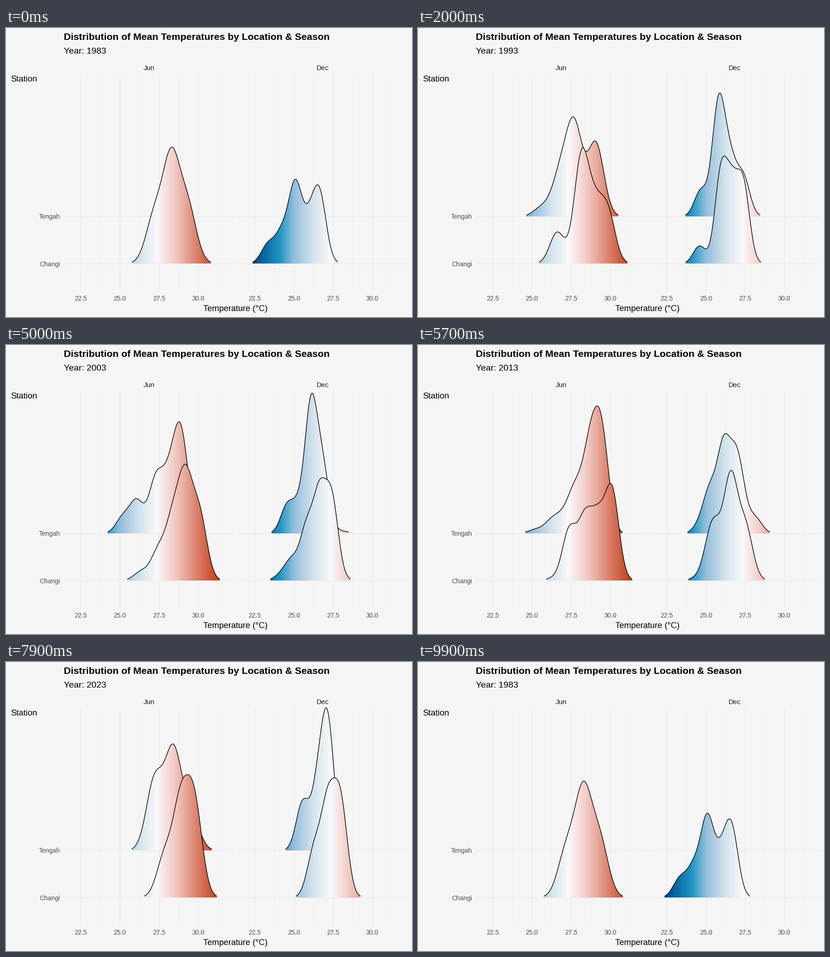
Recreate the animation shown at these times as a matplotlib script. Size 885 px wide and 632 px high, loop 10 s.

```python
import numpy as np
import matplotlib.pyplot as plt
from matplotlib.animation import FuncAnimation
from matplotlib.colors import LinearSegmentedColormap
from matplotlib.path import Path

W, H, DPI = 885, 632, 64
PX = 72 / DPI                  # points per pixel
CUT = 3                        # ridges are trimmed below this height
TOP, BOTTOM, DEG = 101, 576, 34.2
PANELS = {"Jun": (126, 497, 162.5), "Dec": (505, 876, 542)}  # left, right, x of 22.5 degrees
BASES = {"Tengah": 412, "Changi": 515}
STARTS = [11, 31, 50, 70, 90]  # first moving frame of each transition
X = np.arange(126, 876, 0.5)


def density(width, *modes):
    """Sum of equal-width bells, each given as (x, height)."""
    return sum(h * np.exp(-((X - x) / width) ** 2 / 2) for x, h in modes)


STATES = {
    1983: {
        "Jun Changi": density(18.5, (323, 100), (360, 223), (396, 118)),
        "Dec Changi": density(14.5, (570, 40), (600, 62), (630, 168), (660, 75), (683, 145)),
    },
    1993: {
        "Jun Tengah": density(17.5, (270, 20), (309, 86), (340, 194), (387, 159)),
        "Jun Changi": density(16, (303, 68), (356, 231), (386, 106), (413.5, 106)),
        "Dec Tengah": density(14, (616, 56), (655, 247), (681, 107), (709, 82)),
        "Dec Changi": density(13.5, (613, 38), (660, 192), (684, 146), (709, 164)),
    },
    2003: {
        "Jun Tengah": density(15, (254, 38), (284, 75), (326, 123), (355, 108), (380, 210)),
        "Jun Changi": density(16, (294.5, 21), (332, 55), (363, 121), (391, 221), (422, 125)),
        "Dec Tengah": density(13.5, (611, 62), (636, 49), (664.5, 288), (689.5, 132)),
        "Dec Changi": density(14, (599, 13), (621, 42), (655, 112), (683, 172), (709.5, 180)),
    },
    2013: {
        "Jun Tengah": density(15.5, (303, 34), (342, 87), (374, 165), (400, 255)),
        "Jun Changi": density(15, (329, 122), (363, 127), (392, 98), (422.5, 209)),
        "Dec Tengah": density(15, (635, 100), (667, 157), (697, 172), (734, 42)),
        "Dec Changi": density(15.5, (641, 137), (681, 235), (716, 98)),
    },
    2023: {
        "Jun Tengah": density(18, (323.5, 152), (364, 212), (402, 79)),
        "Jun Changi": density(17, (345, 87), (380, 195), (410, 200)),
        "Dec Tengah": density(14, (646, 103), (679, 124), (701, 268)),
        "Dec Changi": density(15, (671, 99), (701, 193), (728.5, 203)),
    },
}
YEARS = list(STATES)

STOPS = [(22.3, "#013f6e"), (22.9, "#03609f"), (24.1, "#2095c4"),
         (25.0, "#93bedc"), (26.2, "#d2e2ec"), (27.35, "#f9f9fa"),
         (28.4, "#f3cfc9"), (29.0, "#ebb2a7"), (30.0, "#db7c65"), (31.5, "#ba3810")]
COLD, HOT = STOPS[0][0], STOPS[-1][0]
CMAP = LinearSegmentedColormap.from_list(
    "temp", [((t - COLD) / (HOT - COLD), c) for t, c in STOPS])

fig = plt.figure(figsize=(W / DPI, H / DPI), dpi=DPI, facecolor="#f5f5f5")
ax = fig.add_axes([0, 0, 1, 1])
ax.axis("off")


def label(x, y, text, size, color="black", ha="left", weight="normal"):
    return ax.text(x, y, text, fontsize=size * PX, color=color, ha=ha,
                   va="baseline", weight=weight, family="Liberation Sans")


def rule(xs, ys, width):
    ax.plot(xs, ys, color="#ebebeb", lw=width * PX, solid_capstyle="butt", zorder=1)


class Ridge:
    def __init__(self, month, station, z):
        self.key = f"{month} {station}"
        self.base = BASES[station]
        left, right, origin = PANELS[month]
        temp = 22.5 + (np.arange(left, right) + 0.5 - origin) / DEG
        colors = CMAP((temp - COLD) / (HOT - COLD))[None, :, :3]
        self.fill = ax.imshow(colors, extent=(left, right, self.base, 80),
                              aspect="auto", interpolation="nearest", zorder=z)
        self.line, = ax.plot([], [], color="black", lw=1.4 * PX, zorder=z + 0.5,
                             solid_capstyle="butt", solid_joinstyle="round")

    def update(self, old, new, f):
        a, b = old.get(self.key), new.get(self.key)
        if f in (0, 1):
            h = b if f else a
        else:  # a ridge missing at either end is not tweened
            h = None if a is None or b is None else (1 - f) * a + f * b
        self.fill.set_visible(h is not None)
        self.line.set_visible(h is not None)
        if h is None:
            return
        keep = h >= CUT
        x, y = X[keep] + 0.5, self.base - h[keep]
        self.line.set_data(x, y)
        outline = np.column_stack([np.r_[x[0], x, x[-1]],
                                   np.r_[self.base, y, self.base]])
        self.fill.set_clip_path(Path(outline), ax.transData)


label(126, 26.5, "Distribution of Mean Temperatures by Location & Season", 21.24,
      weight="bold")
year_text = label(126, 56, "", 19.2)
label(10.5, 117, "Station", 18.6)
label(500.5, 619, "Temperature (°C)", 18.2, ha="center")
for name, base in BASES.items():
    label(118.5, base + 5.5, name, 14, "#4d4d4d", "right")

for month, (left, right, origin) in PANELS.items():
    label((left + right) / 2, 92, month, 15, "#1a1a1a", "center")
    for k in range(8):
        x = origin + 1.25 * k * DEG
        rule([x, x], [TOP, BOTTOM], 0.7 if k % 2 else 1.4)
        if k % 2 == 0:
            label(x, 596, f"{22.5 + 1.25 * k:.1f}", 14, "#4d4d4d", "center")
    for base in BASES.values():
        rule([left, right], [base - 0.5] * 2, 1.4)

ridges = [Ridge(month, station, z) for month in PANELS
          for z, station in enumerate(BASES, 2)]
ax.set(xlim=(0, W), ylim=(H, 0))


def update(n):
    i, k = 0, 0
    for j, start in enumerate(STARTS):
        if n >= start:
            i, k = j, min(n - start + 1, 10)
    old, new = YEARS[i], YEARS[(i + 1) % len(YEARS)]
    year_text.set_text(f"Year: {new if k > 5 else old}")
    for ridge in ridges:
        ridge.update(STATES[old], STATES[new], k / 10)
    return []


anim = FuncAnimation(fig, update, frames=100, interval=100, repeat=True)
plt.show()
```
